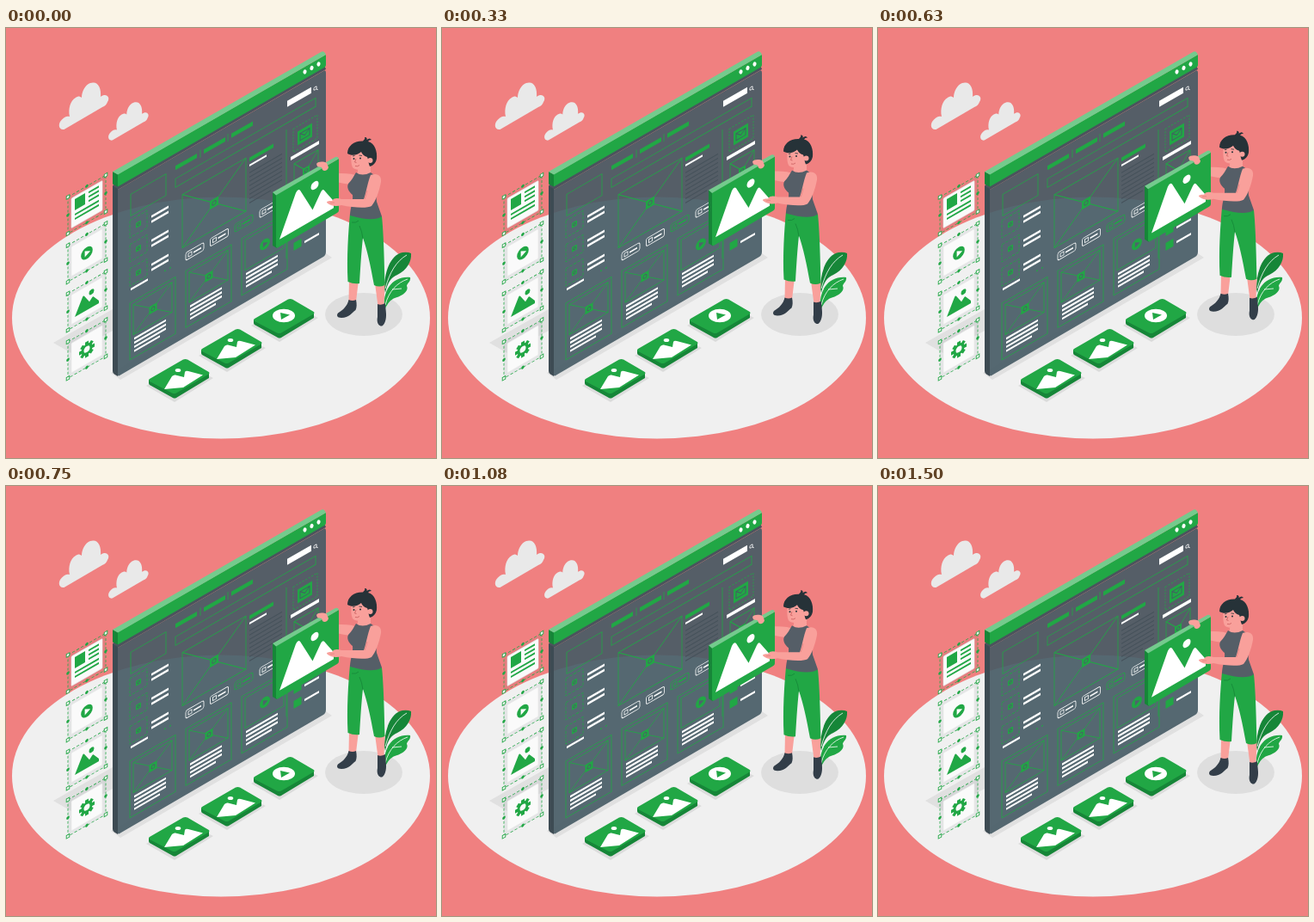
Recreate the animation shown at these times as an HTML page. Size 500 px wide and 500 px high, loop 1.54 s.

```html
<!DOCTYPE html>
<html lang="en">
<head>
<meta charset="utf-8">
<title>Page builder</title>
<style>
  html, body { margin: 0; width: 100%; height: 100%; overflow: hidden; background: #f08080; }
  svg { display: block; width: 100vw; height: 100vh; }
  .g { fill: #21a745; }
  .d { fill: #168638; }
  .w { fill: #fff; }
  .slate { fill: #4f626c; }
  .ink { fill: #263238; }
  .skin { fill: #f9a09b; }
  .line { fill: none; stroke: #21a745; stroke-width: .8; }
  .thin { fill: none; stroke: #fff; stroke-width: .8; }
</style>
</head>
<body>
<svg viewBox="0 0 500 500">
  <defs>
    <path id="cloud" fill="#e9e9e9" d="M67.500 118 C61 119 60 111 65 106.500 C68 103 71 102 74 103 C72 94 75 84 81 81 C84 79 86 79 88 81 C88 74 92 66 98 64 C107 61 111 70 110 80 C116 75 122 80 118 86 C117 89 115 91 112 92Z"/>
    <g id="peaks"><path class="w" d="M4 54 L23 11 Q25.500 7 28 11 L42.500 42 L52 27 Q54 24 56 27 L67 46 V54Z"/><circle class="w" cx="45" cy="15" r="4.500"/></g>
    <g id="tile">
      <path fill="#dcdcdc" d="M163 416 L207 391 L241 407 L196 435Z"/>
      <path class="d" d="M166 409 L196 424 L236 401 V407 L198 430 Q196 431 194 430 L167 415 Q166 414 166 413Z"/>
      <path class="g" d="M167 408 L206 385.500 Q208.500 384.500 211 385.500 L235 399.500 Q238 401 235 403 L198 424.500 Q196 425.500 193 424.500 L167 411 Q165 409.500 167 408Z"/>
    </g>
  </defs>

  <ellipse cx="250" cy="337" rx="243" ry="140.500" fill="#f0f0f0"/>
  <path fill="#e0e0e0" d="M55 366 L124 327 V352 L76 378Z M122 401 L133 409 L379 267 L372 262Z"/>
  <ellipse cx="416" cy="333" rx="45" ry="25" fill="#dedede"/>

  <use href="#cloud"/>
  <use href="#cloud" transform="translate(69 35) scale(.81)"/>

  <path fill="#4a545d" d="M124 183 L366 43.500 Q371 43 372 48 L130 188Z"/>
  <path fill="#3d4b53" d="M124 183 L130 187 V405 L126 402.500 Q124 401 124 399Z"/>
  <path fill="#455a64" opacity=".9" d="M130 188 L369 50 Q372 48 372 52 V260 Q372 264 369 266 L133 403.500 Q131 405 130 404Z"/>
  <path class="d" d="M124 167 L130 170 V184.500 L124 181.500Z"/>
  <path class="g" d="M130 170 L372 31 V43 Q372 45 370 46 L130 184.500Z"/>
  <path fill="#74cb8d" d="M124 167 L367 27.500 Q370 26 372 31 L130 170.500Z"/>
  <g class="w" id="dots"></g>
  <g id="page" transform="matrix(1 -.577 0 1 130 188)"></g>
  <g id="panels"></g>

  <use href="#tile"/><use href="#tile" x="61" y="-35"/><use href="#tile" x="122" y="-70"/>
  <g class="w">
    <path id="hill" d="M184 420 L193 405 Q195 403 197 403.500 L207 406 L208 400 Q209 398 212 399 L229 403.500 L206 418Z"/>
    <ellipse id="sun" cx="200" cy="398" rx="3.300" ry="2"/>
    <use href="#hill" x="61" y="-35"/><use href="#sun" x="61" y="-35"/>
    <ellipse cx="323" cy="334.500" rx="13" ry="7.800"/>
  </g>
  <path class="g" d="M319 331 L330 333.500 L320 339Z"/>

  <path class="d" d="M440 303 C440 286 446 264 461 261 Q467 260 471 262 C472 271 466 282 455 287 C448 290 444 295 441 308Z"/>
  <path class="g" d="M440 325 C438 306 449 288 470 290 C471 295 466 297 466 300 C469 306 460 312 452 314 C447 316 444 320 441 326Z"/>
  <path class="thin" d="M441 303 C446 284 454 271 466 264 M441 322 C445 306 455 296 467 292 M449 304 L460 303"/>

  <g id="lift">
    <path class="skin" d="M383 169 C392 169 400 169 406 171 L405 182 C397 182 388 180 380 178Z"/>
    <path class="skin" d="M399 293 H410 L407 318 H398.500Z M429 297 H440.500 L439.500 323 H432.500Z"/>
    <path fill="#333e49" d="M398.500 316 Q403 318 407 316 C408 321 408 325 406.500 328 C402 331 399 337 390 337 C385 337 384 334 386 331.500 C392 328 397 323 398.500 316Z M432 321 Q436 323 441 320 C441 326 443 333 441.500 339 C440 345 438 347 435.500 346.500 C432 345 431 341 432 336Z"/>
    <path class="g" d="M400 216 L437 219 C439 237 440 273 440.500 299 Q434 302 428 299 C424 277 420 258 415 244 C413 262 412 281 411 297 Q404 298 397.500 295 C396 266 398 238 400 216Z"/>
    <path fill="none" stroke="#168638" stroke-width=".8" d="M415 245 Q414 236 411 230 M402 226 Q407 227 410 224"/>
    <path class="skin" d="M410 160 L424 157 L424 170 Q417 178 408 172Z"/>
    <path fill="#555e67" d="M407 168 Q414 173 424 168 L431 173 C432 185 430 194 431 202 L437 219 Q427 226 400 218 C400 210 404 201 403 194 C398 190 396 185 398 181 C402 177 404 173 407 168Z"/>
    <path class="skin" d="M402 143 C401 151 401 158 403 162 C407 167 418 165 423 158 L425 142 L411 138Z"/>
    <path class="ink" d="M397 146 C397 137 405 131 415 131.500 C416 130 418 129 417 127 C420 127 420 129 419.500 130 Q423 127 425 130 Q422 130 421 132 C429 134 432 144 431 152 C430 157 427 160 423 161 C421 157 422 154 420 150 C416 149 414 146 413 144 C409 148 402 149 397 146Z"/>
    <circle class="skin" cx="423.500" cy="154" r="3"/>
    <g class="ink"><circle cx="404.500" cy="152" r="1"/><circle cx="412" cy="151.500" r="1"/></g>
    <path fill="none" stroke="#263238" stroke-width=".8" d="M403 149 L405.500 148.500 M410.500 148 L414 148.500"/>
    <path fill="none" stroke="#c95d5d" stroke-width=".8" d="M407 152 L405.500 156 L407.500 156.500 M406 160.500 Q409 161.500 411 159.500"/>

    <path class="d" d="M310 191 L315 194 V256 L310 253Z"/>
    <path class="g" d="M314 194 L387 152 V212 Q387 214 385 215 L316 255.500 Q314 256 314 254Z"/>
    <path fill="#74cb8d" d="M310 191 L383 150 Q386 149 387 152 L314 194.500Z"/>
    <use href="#peaks" transform="matrix(1 -.577 0 1 314 194)"/>
    <path class="skin" d="M361 158 C363 155 369 155 373 157 L375 162 C374 166 370 167 368 165 L367 162 L362 161Z"/>
    <path class="skin" d="M424 171 C432 168 437 172 436 179 C434 190 430 201 425 207 C420 210 404 209 390 206 C384 208 377 207 373 203 C373 201 377 201 379 201 C382 197 386 198 390 199 L416 199 C419 191 420 181 424 171Z"/>
    <path fill="none" stroke="#e27d7b" stroke-width=".7" d="M417 199 Q419 194 420 189 M377 203.500 L382 203"/>
  </g>
</svg>
<script>
const $ = id => document.getElementById(id);
const put = (id, html) => $(id).insertAdjacentHTML('beforeend', html);
const box = (x, y, w, h, attrs = 'class="line"') =>
  `<rect x="${x}" y="${y}" width="${w}" height="${h}" ${attrs}/>`;
const solid = (x, y, w, h, cls = 'w') => box(x, y, w, h, `class="${cls}"`);
const path = (d, cls = 'line') => `<path d="${d}" class="${cls}"/>`;
const dot = (x, y, r, cls = 'g') => `<circle cx="${x}" cy="${y}" r="${r}" class="${cls}"/>`;
const each = (list, fn) => list.map(fn).join('');
const play = (x, y, r, cls) => dot(x, y, r) +
  path(`M${x - r * .35} ${y - r * .5} L${x + r * .6} ${y} L${x - r * .35} ${y + r * .5}Z`, cls);
const cross = (x, y, w, h) => box(x, y, w, h) +
  path(`M${x} ${y} l${w} ${h} M${x + w} ${y} l${-w} ${h}`);
const badge = (x, y, r) => box(x - r, y - r, 2 * r, 2 * r, 'class="g" rx="1"') +
  `<circle cx="${x}" cy="${y}" r="${r * .45}" fill="none" stroke="#4b5d66" stroke-width=".9"/>`;

put('dots', each([[347.5, 51], [355.5, 46.5], [363.5, 42]], ([x, y]) =>
  `<ellipse cx="${x}" cy="${y}" rx="2" ry="2.7" transform="rotate(20 ${x} ${y})"/>`));

// Page contents, laid out flat and skewed as a whole
const bars = each([67, 100, 132], x => solid(x, 11, 25, 5, 'g'));
const list = each([0, 28, 56], y =>
  box(14, 44 + y, 20, 20, 'class="line" stroke-dasharray="3 1.5"') + badge(24, 54 + y, 3) +
  solid(39, 52.5 + y, 20, 2.8) + solid(39, 58.5 + y, 20, 2.8));
const pills = each([79, 107.5, 136, 165], (x, i) => {
  const cls = i == 2 ? 'line' : 'thin';
  return box(x, 119, 21, 9, `class="${cls}" rx="2"`) +
    box(x + 3, 121.5, 4, 4, `class="${cls}"`) + solid(x + 9, 122.7, 9, 1.8, i == 2 ? 'g' : 'w');
});
const cards = each([14, 79, 144], (x, i) =>
  box(x, 140, 53, 66) + (i < 2 ? cross(x + 4, 144, 45, 35) + badge(x + 27, 162, 4.5)
                               : box(x + 4, 144, 45, 35) + play(x + 27, 162, 6, 'slate')) +
  each([0, 1, 2, 3], n => solid(x + 5, 183 + n * 4.8, n == 3 ? 30 : 37, 2.4)));
const prose = each([...Array(8).keys()], n =>
  box(153, 68 + n * 5, n == 7 ? 25 : 38, 1.2, 'fill="#46525b"'));
const items = each([167, 184], y => solid(204.5, y - 4, 9, 9, 'g') + solid(217, y + 1, 17, 2.4));

put('page',
  box(15, 14, 41, 25) + bars + path('M96 9 v9 M128 9 v9') + box(67, 26, 163, 10) +
  solid(197, 10.5, 28, 7) + dot(229.5, 14.5, 1.7, 'thin') + path('M231 16 l1.5 2', 'thin') +
  cross(75, 49, 74, 62) + badge(112, 80, 5) +
  list + solid(15, 123.5, 20, 2.4) + dot(55, 126, .9) + dot(61, 126, .9) + pills + cards +
  solid(153, 51, 28, 4.5, 'g') + solid(153, 59, 20, 2.4) + prose +
  path('M196 43 v150') +
  box(204, 47, 28, 27, 'class="line" stroke-dasharray="2 1.500"') + solid(209, 53, 17, 16, 'g') +
  '<path d="M212 57 h11 v8 h-11z l5.500 5 l5.500 -5" fill="none" stroke="#455a64" stroke-width=".9"/>' +
  solid(201, 78, 33, 4) + box(205, 88, 28, 32) + path('M205 88 l28 32 m0 -32 l-28 32') + badge(219, 104, 4) +
  box(201, 130, 33, 28) + items);

// Side widgets
const gear = each([...Array(8).keys()], n =>
  `<rect x="20" y="12.500" width="4" height="5" class="g" transform="rotate(${n * 45} 22 21.500)"/>`) +
  '<circle cx="22" cy="21.500" r="5" fill="none" stroke="#21a745" stroke-width="3"/>';
const article = solid(8, 7, 12, 13, 'g') +
  each([7.5, 12.5, 17.5], y => solid(24, y, 12, 2.2, 'g')) +
  each([24, 29], y => solid(8, y, 28, 2.2, 'g'));
const picture = path('M8 32 L17 14 Q18 12.500 19 14 L25 24 L28 21 Q29 20 30 21 L36 29 V32Z', 'g') + dot(27.5, 14, 3);
put('panels', each([article, play(22, 21.7, 6.8, 'w'), picture, gear], (icon, i) =>
  `<g transform="matrix(1 -.577 0 1 72 ${196.5 + 56.1 * i})">` +
  box(0, 0, 44, 42.5, 'fill="#455a64" opacity=".07"') +
  box(4, 4, 36, 34.5, 'fill="#fafafa" stroke="#e6e6e6" stroke-width=".6" rx="1"') + icon +
  box(0, 0, 44, 42.5, 'class="line" stroke-dasharray="3 2"') +
  each([[0, 0], [44, 0], [0, 42.5], [44, 42.5]], ([x, y]) =>
    box(x - 1.8, y - 1.8, 3.6, 3.6, 'fill="#f0f0f0" stroke="#21a745" stroke-width=".9"')) +
  each([[22, 0], [22, 42.5], [0, 21], [44, 21]], ([x, y]) => dot(x, y, 1.8)) + '</g>'));

// Woman and card rise and sink together
const LOOP = 1540, STEPS = 37, RISE = 8;
const start = performance.now();
function draw(now) {
  const t = (Math.max(0, now - start) % LOOP) / LOOP;
  const p = Math.floor(t * STEPS) / STEPS;
  const y = -RISE * (1 - Math.cos(2 * Math.PI * p)) / 2;
  $('lift').setAttribute('transform', `translate(0 ${y.toFixed(2)})`);
  requestAnimationFrame(draw);
}
draw(start);
</script>
</body>
</html>
```
